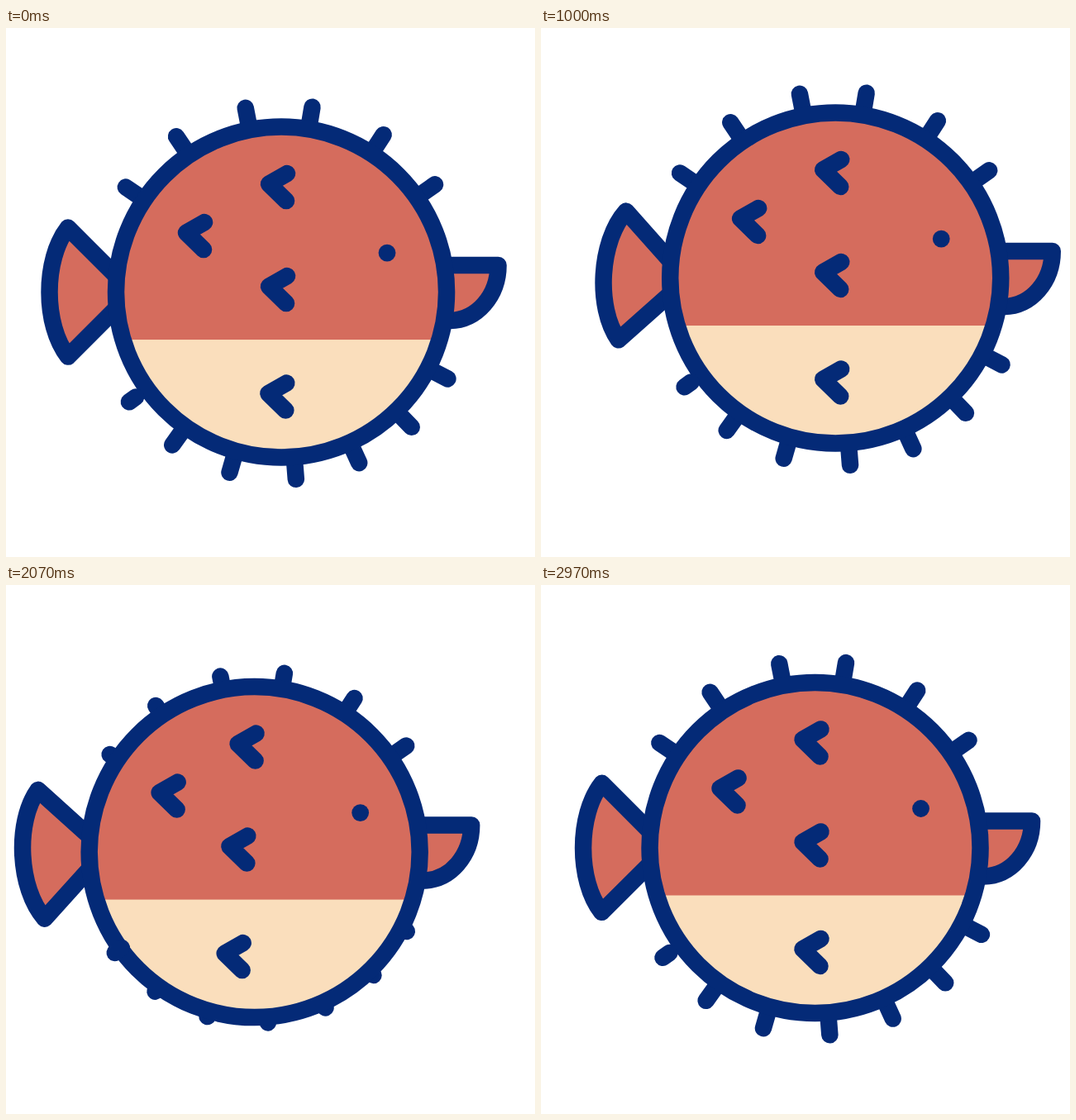
These frames come from a looping animation (640 by 640 pixels, 3000 ms). An HTML page:

```html
<!DOCTYPE html>
<html lang="en">
<head>
<meta charset="utf-8">
<title>Pufferfish</title>
<style>
  html, body { margin: 0; width: 100%; height: 100%; overflow: hidden; background: #fff; }
  svg { display: block; width: 100vw; height: 100vh; }
  .ink { stroke: #042a77; stroke-width: 20.5; stroke-linecap: round; stroke-linejoin: round; }
  .skin { fill: #d56c5d; }
  .none { fill: none; }
</style>
</head>
<body>
<svg viewBox="0 0 640 640">
  <defs>
    <clipPath id="round"><circle r="200"/></clipPath>
  </defs>
  <g id="fish">
    <path id="tail" class="ink skin" d="M-258 -78C-288 -40 -288 40 -258 78L-180 0Z"/>
    <path class="ink skin" d="M190 -32.5H262.5C262.5 4 237 34 204 34.5H190Z"/>
    <g id="under"></g>
    <g clip-path="url(#round)">
      <circle r="200" fill="#fadebc"/>
      <rect class="skin" x="-200" y="-200" width="400" height="257.5"/>
    </g>
    <circle class="ink none" r="200"/>
    <g id="over"></g>
    <circle cx="128" cy="-47.5" r="10.4" fill="#042a77"/>
  </g>
</svg>
<script>
const LOOP = 3000;
const $ = id => document.getElementById(id);

// Swimming path: time, x, y
const path = [
  [0, 333, 319.5], [540, 348, 368], [730, 361.3, 347], [1070, 354, 294],
  [1330, 337, 275], [1670, 318, 291], [2070, 300.7, 323], [2230, 296, 338],
  [2390, 304, 347], [2570, 316, 340], [2970, 331.5, 318]
];

// Monotone cubic through the path, wrapping around the loop
function along(axis) {
  const n = path.length;
  const time = i => path[(i + n) % n][0] + Math.floor(i / n) * LOOP;
  const value = i => path[(i + n) % n][axis];
  const span = i => time(i + 1) - time(i);
  const slope = i => (value(i + 1) - value(i)) / span(i);
  const tangent = i => {
    const a = slope(i - 1), b = slope(i), h = span(i - 1), k = span(i);
    return a * b <= 0 ? 0 : 3 * (h + k) / ((2 * k + h) / a + (k + 2 * h) / b);
  };
  return t => {
    let i = n - 1;
    while (time(i) > t) i--;
    const h = span(i), u = (t - time(i)) / h, v = 1 - u;
    return value(i) * v * v * (1 + 2 * u) + value(i + 1) * u * u * (3 - 2 * u)
      + h * u * v * (tangent(i) * v - tangent(i + 1) * u);
  };
}

const ease = p => (1 - Math.cos(Math.PI * Math.min(1, Math.max(0, p)))) / 2;

// 0 → 1 → 0, beginning at start
function pulse(t, start, rise, hold, fall) {
  const s = (t - start + LOOP) % LOOP;
  return ease(s / rise) - ease((s - rise - hold) / fall);
}

// The same pulse twice per loop, the first one earlier by gap
const twice = (t, start, gap, ...shape) =>
  pulse(t, start, ...shape) + pulse(t, start - gap, ...shape);

function add(layer, d) {
  const el = document.createElementNS("http://www.w3.org/2000/svg", "path");
  el.setAttribute("class", "ink none");
  el.setAttribute("d", d);
  return $(layer).appendChild(el);
}

// Spike angles, each row from nose to tail
const rows = [
  { start: 1515, angles: [-35, -57, -80.5, -101, -124, -146] },
  { start: 1728, angles: [27.5, 46, 65.5, 85.5, 106, 125.5, 144.2] }
];
const spikes = rows.flatMap(({ start, angles }) => angles.map((angle, i) => {
  const last = i === 6; // a short spike that lies over the body
  return { el: add(last ? "over" : "under", `M0 0h${last ? -10 : -30}`), angle, start: start + 30 * i };
}));

const scales = [[7, 110], [7, -19.5], [7, -143.5], [-93, -84.5]].map(([x, y], i) => ({
  el: add("over", `M${x} ${y}l-22 12.5l21 20.5`),
  start: 1725 + 115 * i
}));

// Tail flaps, calming down before the loop closes
function tailTurn(t) {
  const flap = Math.sin(Math.PI / 2 * Math.sin(2 * Math.PI * t / 610));
  return -3.6 * flap * Math.min(1, (LOOP - t) / 600);
}

const x = along(1), y = along(2);
const transform = (el, value) => el.setAttribute("transform", value);

function draw() {
  const t = performance.now() % LOOP;
  transform($("fish"), `translate(${x(t)} ${y(t)})`);
  transform($("tail"), `rotate(${tailTurn(t)} -206 0)`);
  for (const { el, angle, start } of spikes) {
    const tip = 227 - 20 * twice(t, start, 1480, 195, 112, 330);
    transform(el, `rotate(${angle}) translate(${tip})`);
  }
  for (const { el, start } of scales) {
    transform(el, `translate(${-21 * twice(t, start, 1765, 355, 0, 355)})`);
  }
  requestAnimationFrame(draw);
}
draw();
</script>
</body>
</html>
```
